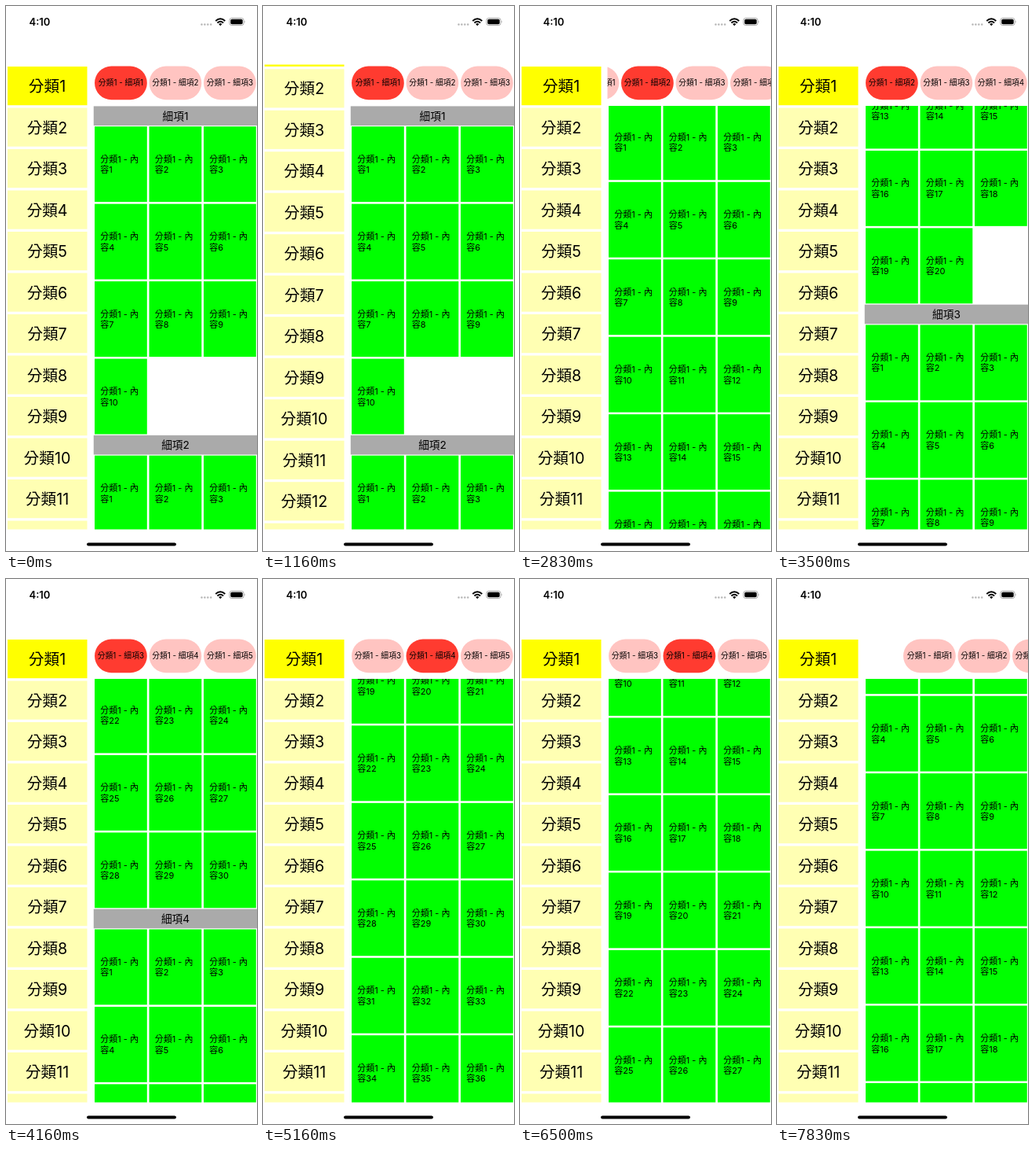
Write an HTML page that moves like this. It is 320 px wide and 693 px high and loops after 8 s.

```html
<!DOCTYPE html>
<html lang="zh-Hant">
<head>
<meta charset="utf-8">
<title>分類</title>
<style>
html, body { margin: 0; width: 100%; height: 100%; overflow: hidden; background: #fff; }
svg { display: block; width: 100%; height: 100%; }
text { font-family: Inter, "Noto Sans CJK TC", "Noto Sans CJK JP", "Noto Sans CJK", sans-serif; white-space: pre; }
.middle { text-anchor: middle; }
.category { font-size: 19.7px; }
.header { font-size: 13.7px; }
.chip { font-size: 9.8px; }
.item { font-size: 11px; }
</style>
</head>
<body>
<svg viewBox="0 0 320 693">
  <defs>
    <clipPath id="sideClip"><rect x="0" y="74.5" width="106" height="591"/></clipPath>
    <clipPath id="chipClip"><rect x="111.5" y="74" width="208.5" height="50"/></clipPath>
    <clipPath id="gridClip"><rect x="111.5" y="127" width="208.5" height="538.5"/></clipPath>
  </defs>
  <rect width="320" height="693" fill="#fff"/>
  <g clip-path="url(#sideClip)"><g id="side"></g></g>
  <g clip-path="url(#chipClip)"><g id="chips"></g></g>
  <g clip-path="url(#gridClip)"><g id="grid"></g></g>

  <text x="43" y="24.6" class="middle" font-size="13" font-weight="600">4:10</text>
  <g fill="#b5b5b5">
    <circle cx="249.5" cy="23.5" r="1.2"/><circle cx="253.4" cy="23.5" r="1.2"/>
    <circle cx="257.3" cy="23.5" r="1.2"/><circle cx="261.2" cy="23.5" r="1.2"/>
  </g>
  <g fill="none" stroke="#000" stroke-width="2">
    <path d="M267.3 19 Q273.3 13.4 279.3 19"/>
    <path d="M269.5 21.4 Q273.3 18 277.1 21.4"/>
  </g>
  <path d="M271.2 23 Q273.3 21.2 275.4 23 L273.3 25.2Z"/>
  <rect x="284.9" y="15.4" width="18.2" height="9.2" rx="2.8" fill="none" stroke="#a0a0a0" stroke-width=".9"/>
  <rect x="286.3" y="16.8" width="15.4" height="6.4" rx="1.6"/>
  <path d="M304.1 18.4 q1.5 1.6 0 3.2z" fill="#a0a0a0"/>
  <rect x="103" y="682.4" width="114" height="4.2" rx="2.1"/>
</svg>
<script>
const LOOP = 8000;
const LEFT = 113, COLUMN = 69.5, CELL_W = 66.8;
const GRID_TOP = 127.4, ROW = 98.46, CELL_H = 95.9, HEADER = 24.6;
const CATEGORY_STEP = 52.5;
const byId = id => document.getElementById(id);

// Scroll positions of the three lists, held until the next step.
// The active chip follows the section at the top of the grid.
const steps = [
  { at: 0, side: 0, chips: 0, grid: 0, active: 1 },
  { at: 500, side: 16 },
  { at: 830, side: 43 },
  { at: 1160, side: 49.3 },
  { at: 1500, side: 102.8 },
  { at: 1830, side: 108.8 },
  { at: 2160, side: -30 },
  { at: 2500, side: 0 },
  { at: 2830, chips: 53.5, grid: 446.3, active: 2 },
  { at: 3160, chips: 69.5, grid: 740 },
  { at: 3500, grid: 880 },
  { at: 3830, chips: 139, grid: 1280, active: 3 },
  { at: 4160, grid: 1849.2 },
  { at: 4500, grid: 2145, active: 4 },
  { at: 4830, grid: 2310 },
  { at: 5160, grid: 2797.5 },
  { at: 5500, grid: 2930 },
  { at: 5830, grid: 2983 },
  { at: 6160, grid: 3024 },
  { at: 6500, grid: 2512 },
  { at: 6830, grid: 2244.4 },
  { at: 7830, chips: -48 }
];
steps.forEach((step, i) => { steps[i] = { ...steps[i - 1], ...step }; });

const rect = (x, y, w, h, fill, rx = 0) =>
  `<rect x="${x}" y="${y}" width="${w}" height="${h}" rx="${rx}" fill="${fill}"/>`;
const label = (x, y, cls, words) => `<text x="${x}" y="${y}" class="${cls}">${words}</text>`;

function drawSide(scroll) {
  let out = "";
  for (let i = 0; i < 20; i++) {
    const y = 77 + i * CATEGORY_STEP - scroll;
    out += rect(2, y, 101.5, 49.2, i ? "#ffffb3" : "#ffff00")
      + label(52.5, y + 32, "category middle", `分類${i + 1}`);
  }
  return out;
}

function drawChips(scroll, active) {
  let out = "";
  for (let i = 0; i < 5; i++) {
    const x = LEFT + i * COLUMN - scroll;
    out += rect(x, 76.6, CELL_W, 42.6, i + 1 === active ? "#ff3b30" : "#ffc4c1", 21.3)
      + label(x + CELL_W / 2, 101.4, "chip middle", `分類1 - 細項${i + 1}`);
  }
  return out;
}

function drawGrid(scroll) {
  const visible = (y, h) => y + h > 120 && y < 670;
  let out = "", top = GRID_TOP - scroll;
  for (let section = 1; section <= 5; section++) {
    if (visible(top, HEADER)) {
      out += rect(111.5, top, 208.5, HEADER, "#aaa")
        + label(216, top + 17.6, "header middle", `細項${section}`);
    }
    top += HEADER;
    const count = section * 10, rows = Math.ceil(count / 3);
    for (let i = 0; i < count; i++) {
      const x = LEFT + i % 3 * COLUMN;
      const y = top + 1.2 + Math.floor(i / 3) * ROW;
      if (!visible(y, CELL_H)) continue;
      out += rect(x, y, CELL_W, CELL_H, "#00ff00")
        + label(x + 7.3, y + 45.4, "item", "分類1 - 內")
        + label(x + 7.3, y + 59, "item", `容${i + 1}`);
    }
    top += rows * ROW;
  }
  return out;
}

let shown;
function render(time) {
  const state = steps.findLast(step => step.at <= time);
  if (state === shown) return;
  shown = state;
  byId("side").innerHTML = drawSide(state.side);
  byId("chips").innerHTML = drawChips(state.chips, state.active);
  byId("grid").innerHTML = drawGrid(state.grid);
}

const start = performance.now();
function tick() {
  render((performance.now() - start) % LOOP);
  requestAnimationFrame(tick);
}
tick();
</script>
</body>
</html>
```
